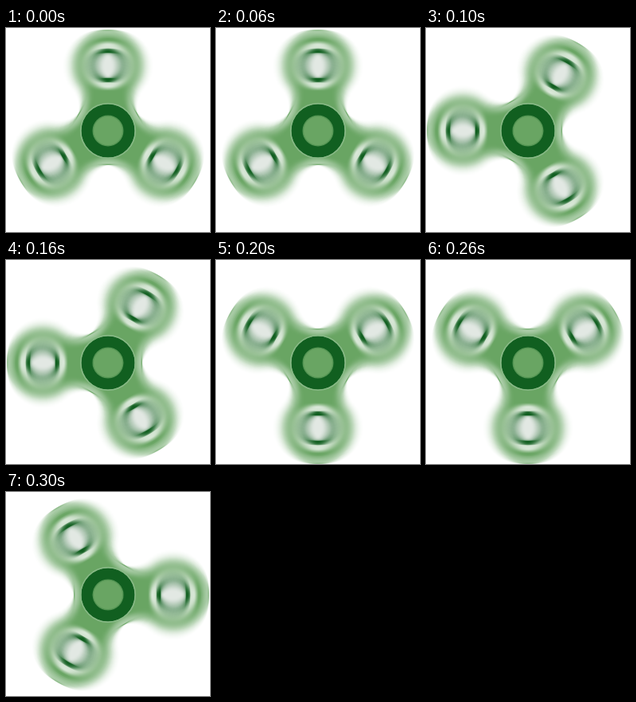
Animation, 256 px wide and 256 px high, one loop 400 ms. Source, as an HTML page with a canvas:

```html
<!DOCTYPE html>
<html lang="en">
<head>
<meta charset="utf-8">
<title>Spinner</title>
<style>
  html, body { margin: 0; width: 100%; height: 100%; overflow: hidden; background: #fff; }
  canvas {
    display: block;
    position: absolute;
    left: 0;
    top: 0;
    animation: spin 400ms steps(4) infinite;
  }
  @keyframes spin { to { transform: rotate(-360deg); } }
</style>
</head>
<body>
<canvas id="spinner" width="256" height="258"></canvas>
<script>
  const canvas = document.getElementById('spinner');
  const ctx = canvas.getContext('2d', { willReadFrequently: true });
  const { width, height } = canvas;
  const TAU = Math.PI * 2;
  const GREEN = '#69a563', DARK = '#115f20';
  const ARM = 82, LOBE = 45, WAIST = 42.5;
  const BLUR = 8.5 * Math.PI / 180, SAMPLES = 24;

  // Concave fillet that touches two neighbouring lobes and the waist.
  const lobeX = ARM / 2, lobeY = ARM * Math.sin(TAU / 6);
  const fillet = ((WAIST - lobeX) ** 2 + lobeY ** 2 - LOBE ** 2) / (2 * (LOBE - WAIST + lobeX));
  const filletDistance = WAIST + fillet;
  const touch = Math.atan2(lobeY, filletDistance - lobeX);

  function disc(x, y, radius, fill) {
    ctx.beginPath();
    ctx.arc(x, y, radius, 0, TAU);
    ctx.fillStyle = fill;
    ctx.fill();
  }

  function ring(radius, lineWidth, color) {
    ctx.beginPath();
    ctx.arc(0, 0, radius, 0, TAU);
    ctx.lineWidth = lineWidth;
    ctx.strokeStyle = color;
    ctx.stroke();
  }

  function bodyPath() {
    const reach = TAU / 6 + touch;
    ctx.beginPath();
    for (let i = 0; i < 3; i++) {
      const arm = -TAU / 4 + i * TAU / 3, notch = arm + TAU / 6;
      ctx.arc(ARM * Math.cos(arm), ARM * Math.sin(arm), LOBE, arm - reach, arm + reach);
      ctx.arc(filletDistance * Math.cos(notch), filletDistance * Math.sin(notch), fillet,
        notch + Math.PI + touch, notch + Math.PI - touch, true);
    }
    ctx.closePath();
  }

  function drawBody() {
    ctx.save();
    bodyPath();
    ctx.fillStyle = GREEN;
    ctx.fill();
    ctx.clip();
    // Pale bevel that fades inwards, closed by a thin green rim.
    ctx.strokeStyle = 'rgba(225,238,225,.17)';
    for (let depth = 2; depth <= 10; depth += 2) {
      ctx.lineWidth = depth * 2;
      ctx.stroke();
    }
    ctx.lineWidth = 2;
    ctx.strokeStyle = GREEN;
    ctx.stroke();
    ctx.restore();
  }

  function drawSpinner(angle) {
    ctx.setTransform(1, 0, 0, 1, 0, 0);
    ctx.fillStyle = '#fff';
    ctx.fillRect(0, 0, width, height);
    ctx.translate(width / 2, height / 2);
    ctx.rotate(angle);
    drawBody();
    for (let i = 0; i < 3; i++) {
      const glow = ctx.createRadialGradient(0, -ARM, 21, 0, -ARM, 32);
      glow.addColorStop(0, 'rgba(240,245,240,.75)');
      glow.addColorStop(.55, 'rgba(240,245,240,.85)');
      glow.addColorStop(1, 'rgba(240,245,240,0)');
      disc(0, -ARM, 32, glow);
      disc(0, -ARM, 21.5, DARK);
      disc(0, -ARM, 16, '#e2e8e3');
      ctx.rotate(TAU / 3);
    }
  }

  // Weighted average of poses gives the rotational motion blur.
  const sum = new Float32Array(width * height * 4);
  let total = 0;
  for (let k = -SAMPLES; k <= SAMPLES; k++) {
    const weight = SAMPLES + 1 - Math.abs(k);
    drawSpinner(BLUR * k / SAMPLES);
    const pixels = ctx.getImageData(0, 0, width, height).data;
    for (let i = 0; i < sum.length; i++) sum[i] += pixels[i] * weight;
    total += weight;
  }
  const blurred = ctx.createImageData(width, height);
  for (let i = 0; i < sum.length; i++) blurred.data[i] = sum[i] / total;
  ctx.putImageData(blurred, 0, 0);

  ctx.setTransform(1, 0, 0, 1, width / 2, height / 2);
  disc(0, 0, 33.5, DARK);
  ring(34.3, 1.6, '#88b987');
  disc(0, 0, 19.5, '#559654');
  disc(0, 0, 18, GREEN);
</script>
</body>
</html>
```
